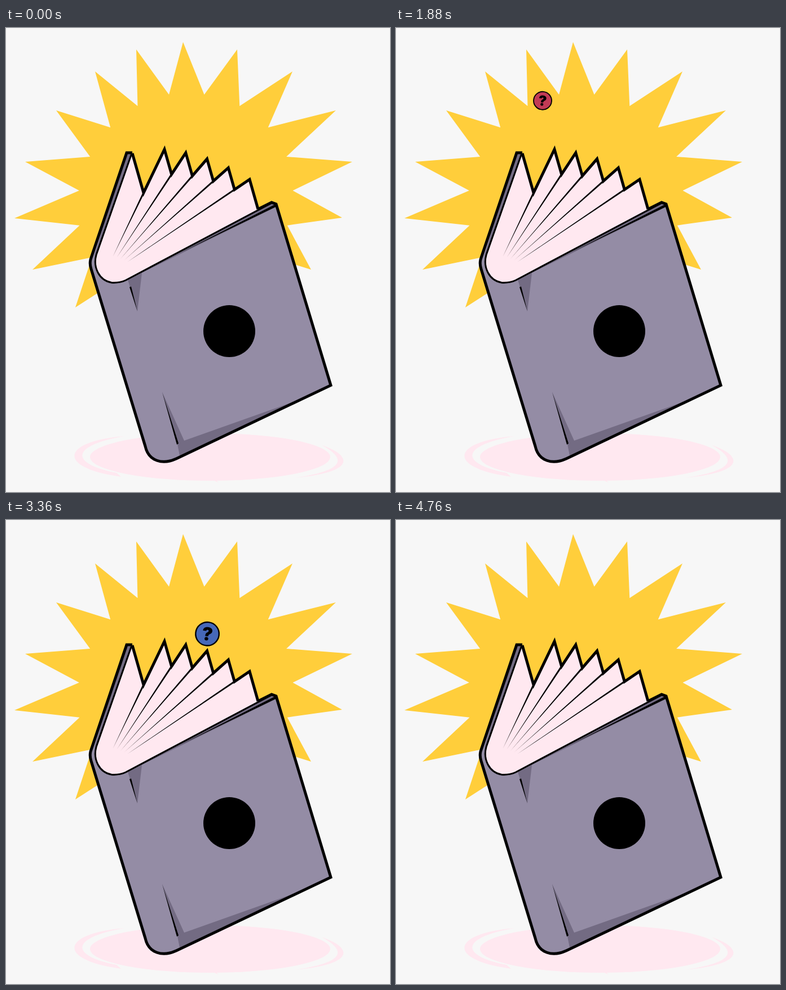
Recreate the animation shown at these times as an HTML page. Size 681x822 px, loop 4.8 s.

```html
<!DOCTYPE html>
<html lang="en">
<head>
<meta charset="utf-8">
<title>Book of questions</title>
<style>
  html, body { margin: 0; width: 100%; height: 100%; overflow: hidden; background: #f7f7f7; }
  svg { display: block; width: 681px; height: 822px; }
  .sun { fill: #ffce3b; }
  .pink { fill: #ffe8f0; }
  .cover { fill: #948ca5; }
  .shade { fill: #736b83; }
  .line { fill: none; stroke: #000; stroke-width: 5; }
  .thin { stroke-width: 3; }
  .badge circle { stroke: #000; stroke-width: 2.4; }
  .badge text { font: 900 32px Inter, Roboto, sans-serif; text-anchor: middle; }
</style>
</head>
<body>
<svg viewBox="0 0 681 822">
  <path class="sun" id="sun"/>

  <g class="pink">
    <ellipse cx="362" cy="760" rx="213" ry="42"/>
    <path d="M355 795H369L376 805Z"/>
    <path d="M210 723C98 732 88 779 204 795L196 788C113 772 113 740 210 723Z"/>
    <path d="M560 739C614 757 622 787 512 797C600 784 606 764 560 739Z"/>
  </g>

  <path class="cover" d="M214 221L150 410Q148 418 151 427L247 741C253 768 278 774 302 763L576 633L479 312L471 309L180 430L224 221Z"/>
  <path class="shade" d="M214 221H224L164 390L156 405Z"/>
  <path class="pink" id="pages"/>
  <path id="creases"/>
  <path class="shade" d="M471 309L479 312V317L240 434L210 448Z"/>
  <path class="shade" d="M216 446L241 434L233 502Z"/>
  <path d="M219 459L222 458L233 502Z"/>
  <path class="shade" d="M277 645L316 731L505 664L576 633L308 758L304 737Z"/>
  <path d="M277 645L306 736L303 738Z"/>
  <path d="M480 311L478 317L310 398Z"/>

  <path class="line" id="edge"/>
  <path class="line thin" d="M223 222L160 402C154 424 165 447 187 451Q201 452 212 447L471 310"/>
  <path class="line" d="M224 221H214L150 410Q148 418 151 427L247 741C253 768 278 774 302 763L576 633L479 312L471 309L447 321"/>

  <circle cx="396" cy="537" r="46"/>

  <g class="badge" id="red"><circle r="20.8" fill="#c23b55"/><text y="11.5">?</text></g>
  <g class="badge" id="blue"><circle r="20.8" fill="#4668b8"/><text y="11.5">?</text></g>
</svg>
<script>
const LOOP = 4800, RISE = 2095;
const { sin, cos, PI } = Math;
const el = id => document.getElementById(id);
const setPath = (id, d) => el(id).setAttribute("d", d);

// Uneven ray tips, clockwise from the lower left, with notches on a circle between them
const tips = [[123, 495], [47, 428], [15, 337], [34, 237], [89, 146], [158, 77], [231, 38],
  [314, 25], [410, 38], [508, 77], [585, 146], [614, 237], [596, 336], [541, 428]];
const rays = tips.map((tip, i) => {
  const a = (i - 6.5) * 2 * PI / 19;
  return [tip, [318 + 7 * sin(2 * Math.abs(a)) + 190 * sin(a), 303.5 - 188 * cos(a)]];
});
setPath("sun", `M165 468L${rays.flat().join("L")}Z`);

// Every page rises from the spine to its peak, then drops until it meets the next page
const DROP = 3.5;
let peak = [224, 222], edge = `M${peak}`, creases = "";
for (let i = 0; i < 5; i++) {
  const next = [281 + 37.75 * i, 215 + 3.7 * i + 2.4 * i * i];
  const root = [190 + 6.5 * i, 404 + 2.5 * i];
  const slope = (root[1] - next[1]) / (next[0] - root[0]);
  const dx = (next[1] - peak[1] + slope * (next[0] - peak[0])) / (DROP + slope);
  const [x, y] = [peak[0] + dx, peak[1] + DROP * dx];
  edge += `L${x} ${y}L${next}`;
  creases += `M${x - 1.2} ${y - 1}L${x + 1.2} ${y + 1}L${root}Z`;
  peak = next;
}
edge += "L447 321";
setPath("edge", edge);
setPath("creases", creases);
setPath("pages", edge + "L212 447Q201 452 187 451C165 447 154 424 160 402Z");

// Each path gives x, y and tilt for a progress from 0 to 1
const badges = [
  { id: "red", start: 370, path: u => [257.6 + 179 * (u - .605) ** 2, 302 - 215 * u - 35 * u * u, 20 - 20 * u] },
  { id: "blue", start: 2295, path: u => [296 + 120 * u, 360 - 311 * u, 27 * u - 7] }
];

function draw() {
  const t = performance.now() % LOOP;
  for (const { id, start, path } of badges) {
    const u = Math.min(Math.max((t - start) / RISE, 0), 1);
    const [x, y, tilt] = path(u);
    el(id).style.display = u > 0 && u < 1 ? "" : "none";
    el(id).setAttribute("transform", `translate(${x} ${y}) rotate(${tilt}) scale(${sin(PI * u)})`);
  }
  requestAnimationFrame(draw);
}
draw();
</script>
</body>
</html>
```
